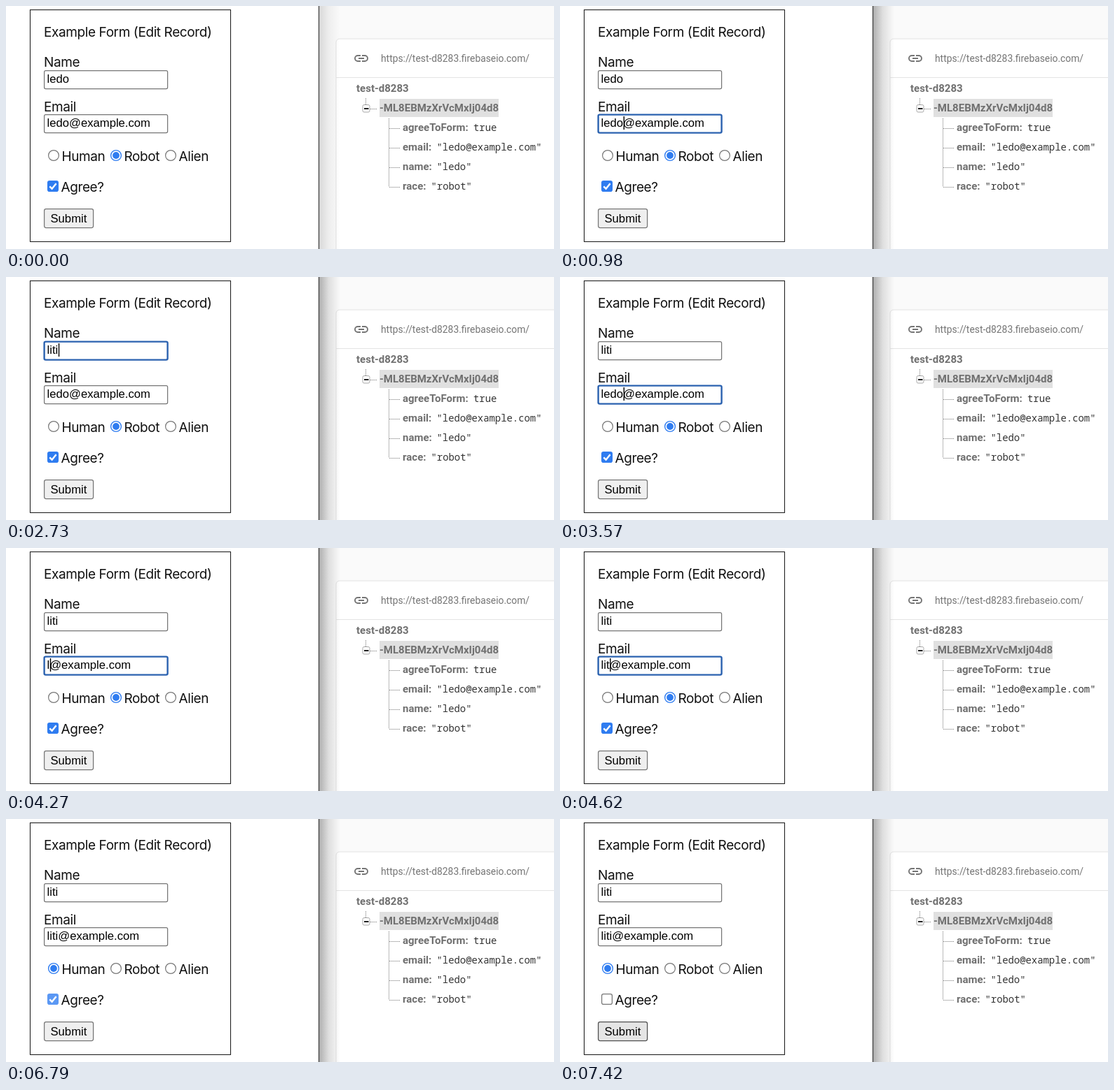
An HTML page for the animation above (8000 ms loop, 782 by 348 pixels).

```html
<!DOCTYPE html>
<html lang="en">
<head>
<meta charset="utf-8">
<title>Edit record form</title>
<style>
  html, body { margin: 0; width: 100%; height: 100%; overflow: hidden; background: #fff; }
  svg { display: block; width: 100vw; height: 100vh; }
  text { white-space: pre; }
  .label { font: 19px Inter, sans-serif; letter-spacing: -.4px; fill: #111; }
  .control { font: 16.67px "Liberation Sans", Arial, sans-serif; fill: #000; }
  .url { font: 13.85px Roboto, sans-serif; fill: #757575; }
  .key { font: bold 15px Roboto, sans-serif; fill: #707070; }
  .value { font: 13.9px "Noto Sans Mono", "DejaVu Sans Mono", monospace; fill: #333; }
  .dots { fill: none; stroke: #777; stroke-dasharray: 1 1; }
  .frame { fill: #fff; stroke: #767676; stroke-width: 1.25; }
  .focus .frame { stroke: #2b62b0; stroke-width: 2.4; }
  .selection { fill: #b4d5fa; }
  .ring { fill: #fff; stroke: #767676; stroke-width: 1.2; }
  .dot { fill: #2f7cf0; visibility: hidden; }
  .on .ring { stroke: #2f7cf0; stroke-width: 1.4; }
  .on .dot { visibility: visible; }
  .hover .ring { stroke: #4f4f4f; }
  .press .ring { stroke: #8d8d8d; }
  .on.hover .ring { stroke: #1e62c8; }
  .box { fill: #fff; stroke: #767676; stroke-width: 1.25; }
  .tick { fill: none; stroke: #fff; stroke-width: 2.4; visibility: hidden; }
  .on .box { fill: #2f7cf0; stroke: #2f7cf0; }
  .on .tick { visibility: visible; }
  .hover .box { stroke: #4f4f4f; }
  .on.hover .box { fill: #1f66d0; stroke: #1f66d0; }
  .on.press .box { fill: #5b98f4; stroke: #5b98f4; }
  .button { fill: #efefef; stroke: #767676; stroke-width: 1.25; }
  .hover .button { fill: #e5e5e5; stroke: #4f4f4f; }
</style>
</head>
<body>
<svg viewBox="0 0 782 348">
  <defs>
    <linearGradient id="fade">
      <stop offset="0" stop-color="#000" stop-opacity=".3"/>
      <stop offset=".45" stop-color="#000" stop-opacity=".11"/>
      <stop offset="1" stop-color="#000" stop-opacity="0"/>
    </linearGradient>
  </defs>

  <rect x="447" width="335" height="348" fill="#fafafa"/>
  <path d="M471 349V52a5 5 0 0 1 5-5h307v302z" fill="#fff" stroke="#e3e3e3"/>
  <path d="M471 102.5h311" stroke="#e4e4e4"/>
  <path d="M506 71h-4a4 4 0 0 0 0 8h4M508 71h4a4 4 0 0 1 0 8h-4M503 75h8" fill="none" stroke="#757575" stroke-width="1.9"/>
  <text class="url" x="535" y="80">https://test-d8283.firebaseio.com/</text>

  <text class="key" x="500" y="123">test-d8283</text>
  <rect x="533" y="133" width="170" height="26" fill="#e0e0e0"/>
  <text class="key" x="533" y="151">-ML8EBMzXrVcMxIj04d8</text>
  <path class="dots" d="M513.5 132v9M520 147.5h9M546.5 161v98"/>
  <rect x="509" y="141.5" width="10" height="10.5" rx="2" fill="#fff" stroke="#aaa"/>
  <path d="M511 147h6.5" stroke="#222" stroke-width="2"/>
  <g id="tree"></g>

  <rect id="shadow" x="447" width="30" height="348" fill="url(#fade)"/>
  <path d="M446.5 0v348" stroke="#444" stroke-width="1.3"/>

  <rect x="34.5" y="5.5" width="286" height="332" fill="#fff" stroke="#222" stroke-width="1.1"/>
  <text class="label" x="54" y="44">Example Form (Edit Record)</text>
  <text class="label" x="54" y="87">Name</text>
  <text class="label" x="54" y="151">Email</text>
  <g id="name"></g>
  <g id="email"></g>
  <g id="radios"></g>
  <g id="agree">
    <rect class="box" x="59.6" y="250.6" width="14.8" height="14.8" rx="2.5"/>
    <path class="tick" d="M62.3 258.3l3.3 3.4 6-7.5"/>
  </g>
  <text class="label" x="78.5" y="266">Agree?</text>
  <g id="submit">
    <rect class="button" x="54.6" y="290.6" width="70" height="27" rx="2.5"/>
    <text class="control" x="63.5" y="309.5">Submit</text>
  </g>
</svg>
<script>
const LOOP = 8000;
const TEXT_X = 58.5;
const byId = id => document.getElementById(id);

byId('tree').innerHTML = [
  ['agreeToForm', 'true', 667],
  ['email', '"ledo@example.com"', 614.5],
  ['name', '"ledo"', 614.5],
  ['race', '"robot"', 606.5],
].map(([key, value, x], i) => {
  const y = 179 + 28 * i;
  return `<path class="dots" d="M547 ${y - 3.5}h15"/>
    <text class="key" x="566" y="${y}">${key}:</text>
    <text class="value" x="${x}" y="${y}">${value}</text>`;
}).join('');

byId('radios').innerHTML = [['human', 'Human', 68], ['robot', 'Robot', 157], ['alien', 'Alien', 235]]
  .map(([id, label, x]) => `<g id="${id}">
    <circle class="ring" cx="${x}" cy="214" r="7.4"/><circle class="dot" cx="${x}" cy="214" r="4.9"/></g>
    <text class="label" x="${x + 11.5}" y="222">${label}</text>`).join('');

function makeField(id, top) {
  const group = byId(id);
  group.innerHTML = `<rect class="frame" x="54.6" y="${top + .6}" width="176" height="26" rx="2"/>
    <rect class="selection" x="${TEXT_X}" y="${top + 3}" height="19"/>
    <text class="control" x="${TEXT_X}" y="${top + 18}"></text>
    <rect class="caret" y="${top + 3}" width="1.4" height="19"/>`;
  const [, selection, text, caret] = group.children;
  return ({ value, focus, cursor, selected }) => {
    group.setAttribute('class', focus ? 'focus' : '');
    text.textContent = value;
    const widthOf = n => n ? text.getSubStringLength(0, n) : 0;
    selection.setAttribute('width', widthOf(selected));
    caret.setAttribute('x', TEXT_X + widthOf(cursor) + .6);
    caret.setAttribute('visibility', cursor ? 'visible' : 'hidden');
  };
}
const fields = { name: makeField('name', 92), email: makeField('email', 155) };

const idle = value => ({ value });
const typing = (value, cursor) => ({ value, cursor, focus: true });
const chosen = (value, selected) => ({ value, selected, focus: true });

// Each step: time in ms, then what changes from then on.
const steps = [
  [0, { name: idle('ledo'), email: idle('ledo@example.com'), shadow: .45,
        human: '', robot: 'on', alien: '', agree: 'on', submit: '' }],
  [980, { email: typing('ledo@example.com', 4), shadow: 1 }],
  [1050, { name: chosen('ledo', 4), email: idle('ledo@example.com') }],
  [2310, { name: typing('l', 1) }],
  [2380, { name: typing('li', 2) }],
  [2520, { name: typing('lit', 3) }],
  [2730, { name: typing('liti', 4) }],
  [3220, { name: typing('liti', 0) }],
  [3570, { name: idle('liti'), email: typing('ledo@example.com', 4) }],
  [3640, { email: chosen('ledo@example.com', 4) }],
  [4200, { email: typing('l@example.com', 1) }],
  [4410, { email: typing('li@example.com', 2) }],
  [4620, { email: typing('lit@example.com', 3) }],
  [4760, { email: typing('liti@example.com', 4) }],
  [5250, { email: typing('liti@example.com', 0) }],
  [5530, { human: 'hover' }],
  [5810, { email: typing('liti@example.com', 4) }],
  [5950, { email: idle('liti@example.com'), human: 'press' }],
  [6090, { human: 'on hover', robot: '' }],
  [6300, { human: 'on' }],
  [6580, { agree: 'on hover' }],
  [6790, { agree: 'on press' }],
  [6930, { agree: 'hover' }],
  [7210, { agree: '' }],
  [7420, { submit: 'hover' }],
];

function render(state) {
  for (const id in fields) fields[id](state[id]);
  for (const id of ['human', 'robot', 'alien', 'agree', 'submit']) {
    byId(id).setAttribute('class', state[id]);
  }
  byId('shadow').setAttribute('opacity', state.shadow);
}

let shown = 0;
function tick() {
  const time = performance.now() % LOOP;
  const past = steps.filter(([start]) => start <= time);
  if (past.length !== shown) {
    shown = past.length;
    render(Object.assign({}, ...past.map(([, change]) => change)));
  }
  requestAnimationFrame(tick);
}
tick();
</script>
</body>
</html>
```
